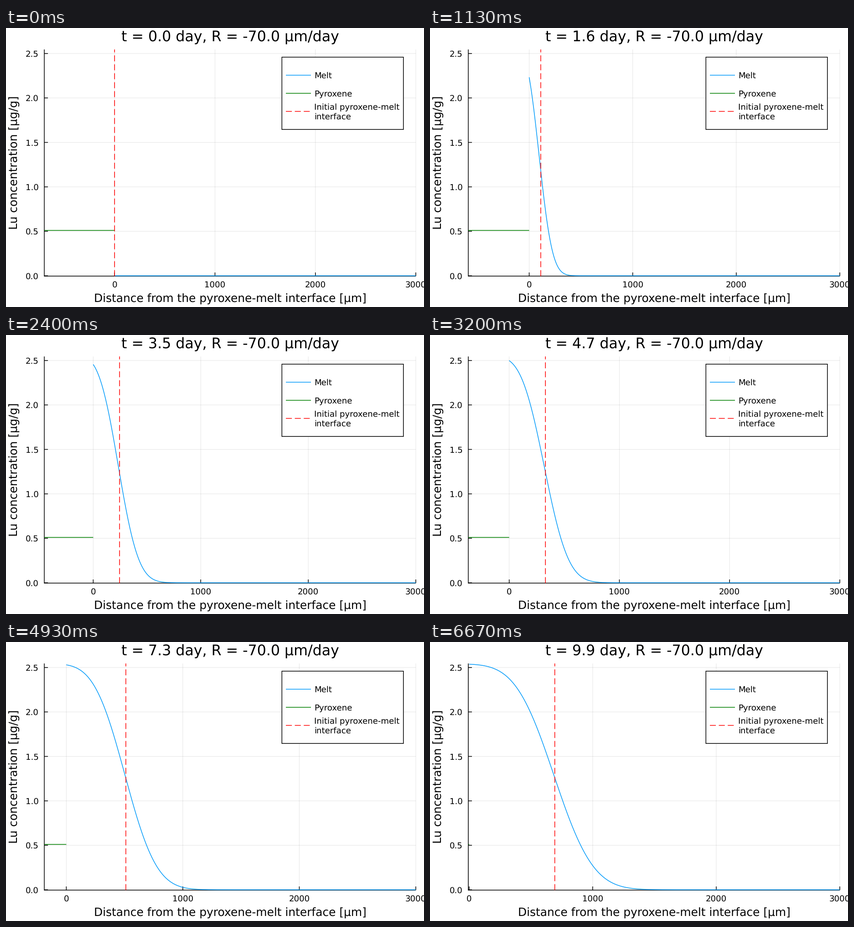
Write a matplotlib script that moves like this. It is 917 px wide and 611 px high and loops after 6740 ms.

```python
import math

import matplotlib.pyplot as plt
import numpy as np
from matplotlib.animation import FuncAnimation

plt.rcParams.update({
    "font.family": "DejaVu Sans",
    "text.hinting": "none",
    "path.snap": False,
    "lines.dash_capstyle": "butt",
    "lines.solid_capstyle": "butt",
    "lines.scale_dashes": False,
})

W, H, DPI = 917, 611, 100
PT = 72 / DPI                      # points per pixel
LEFT, RIGHT, TOP, BOTTOM = 84, 899, 47, 543.4
Y0, Y_UNIT = 542.6, 194.7          # pixel row of zero, pixels per µg/g
TITLE, GUIDE, SMALL = 31.7, 24.9, 18.1
LINE = 1.5
DASH = (0, (13.1 * PT, 6.5 * PT))

FRAMES, LOOP = 101, 6740
RATE = 70.0                        # µm/day
DIFF = 3250.0                      # µm²/day
C_MELT, C_PYX, K_GARNET = 2.54, 0.51, 1.115
X_MAX, PYX_SIZE, RIM_END = 3000.0, 700.0, 2400.0

MELT, PYX, START, GARNET = "#009AFA", "green", "red", "blue"

erfc = np.vectorize(math.erfc)

fig = plt.figure(figsize=(W / DPI, H / DPI), dpi=DPI, facecolor="white")
ax = fig.add_axes([0, 0, 1, 1])
ax.set_xlim(0, W)
ax.set_ylim(H, 0)
ax.axis("off")


def line(xs, ys, color="black", width=LINE, z=3, **kw):
    return ax.plot(xs, ys, color=color, lw=width * PT, zorder=z, **kw)[0]


def label(x, y, text, size=SMALL, ha="center", va="baseline", z=6, **kw):
    return ax.text(x, y, text, fontsize=size * PT, ha=ha, va=va, zorder=z, **kw)


def to_y(c):
    return Y0 - Y_UNIT * np.asarray(c)


def melt_profile(x, t):
    """Advection and diffusion away from an interface with constant inflow."""
    if t == 0:
        return np.zeros_like(x)
    spread = 2 * math.sqrt(DIFF * t)
    shift = RATE * t
    peclet = RATE * shift / DIFF
    ahead = (x - shift) / spread
    front = 0.5 * erfc(ahead)
    bump = math.sqrt(peclet / math.pi) * np.exp(-ahead ** 2)
    back = (0.5 * (1 + RATE * x / DIFF + peclet)
            * np.exp(RATE * x / DIFF) * erfc((x + shift) / spread))
    return C_MELT * np.maximum(front + bump - back, 0)


# Fixed axes
for c in np.arange(0, 2.6, 0.5):
    y = to_y(c)
    line([LEFT, RIGHT], [y, y], width=1, z=1, alpha=0.1)
    line([LEFT, LEFT + 8], [y, y])
    label(72, y + 6.7, f"{c:.1f}", ha="right")
line([LEFT, LEFT], [TOP, BOTTOM + LINE / 2])
line([LEFT, RIGHT], [BOTTOM, BOTTOM])

label((LEFT + RIGHT) / 2, 599.3,
      "Distance from the pyroxene-melt interface [µm]", GUIDE)
label(25, (TOP + BOTTOM) / 2, "Lu concentration [µg/g]", GUIDE,
      va="center", rotation=90, rotation_mode="anchor").set_va("baseline")
title = label((LEFT + RIGHT) / 2, 28.2, "", TITLE)

# Moving x ticks
ticks = []
for _ in range(6):
    grid = line([], [], width=1, z=1, alpha=0.1)
    mark = line([], [])
    ticks.append((grid, mark, label(0, 567.6, "")))

# Curves
melt = line([], [], MELT, z=4)
pyroxene = line([], [], PYX, z=4)
start = line([], [], START, z=4.5, ls=DASH)
garnet = line([], [], GARNET, z=4.6)

# Legend
BOX_X, BOX_Y, ROW = 605.3, 63.8, 39.6
box = plt.Rectangle((BOX_X, BOX_Y), 266.5, 4 * ROW, facecolor="white",
                    edgecolor="black", lw=LINE * PT, zorder=5)
ax.add_patch(box)


def entry(row, color, lines, **kw):
    y = BOX_Y + row * ROW
    parts = [line([614, 669], [y, y], color, z=6, **kw)]
    for k, text in enumerate(lines):
        offset = (k - (len(lines) - 1) / 2) * 20
        parts.append(label(676.3, y + offset + 6.7, text, ha="left"))
    return parts


entry(1, MELT, ["Melt"])
entry(2, PYX, ["Pyroxene"])
entry(3, START, ["Initial pyroxene-melt", "interface"], ls=DASH)
rim_entry = entry(4, GARNET, ["Garnet rim", "after crystallisation"])


def draw(i):
    t = i / 10
    done = i == FRAMES - 1
    x_min = RATE * t - PYX_SIZE

    def to_x(x):
        return LEFT + (RIGHT - LEFT) * (x - x_min) / (X_MAX - x_min)

    title.set_text(f"t = {t:.1f} day, R = {-RATE:.1f} µm/day")

    values = range(500, 3001, 500) if done else range(0, 3001, 1000)
    for k, (grid, mark, text) in enumerate(ticks):
        shown = k < len(values)
        for part in (grid, mark, text):
            part.set_visible(shown)
        if shown:
            x = to_x(values[k])
            grid.set_data([x, x], [TOP, BOTTOM])
            mark.set_data([x, x], [BOTTOM - 8, BOTTOM])
            text.set_x(x)
            text.set_text(str(values[k]))

    x = np.linspace(0, X_MAX, 601)
    c = melt_profile(x, t)
    melt.set_data(to_x(x), to_y(c))
    pyroxene.set_data([LEFT, to_x(0)], to_y([C_PYX, C_PYX]))
    pyroxene.set_visible(not done)
    x_start = to_x(RATE * t)
    start.set_data([x_start, x_start], [BOTTOM, TOP])

    rim = (x >= PYX_SIZE) & (x <= RIM_END)
    garnet.set_data(to_x(x[rim]), to_y(K_GARNET * c[rim]))
    for part in [garnet, *rim_entry]:
        part.set_visible(done)
    box.set_height((5 if done else 4) * ROW)
    return []


anim = FuncAnimation(fig, draw, frames=FRAMES, interval=LOOP / FRAMES,
                     init_func=lambda: draw(0), repeat=True, repeat_delay=0,
                     blit=False)
plt.show()
```
